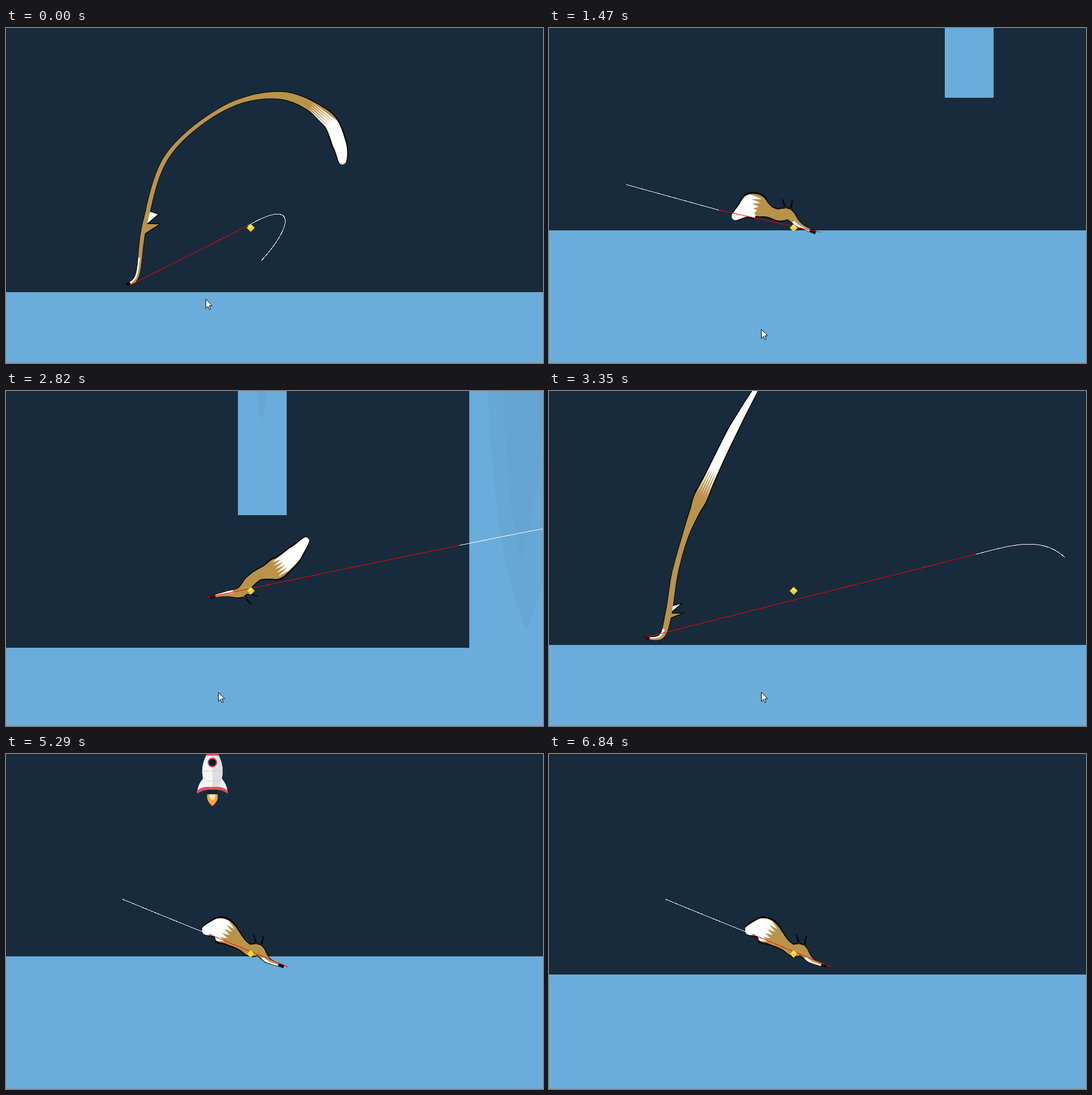
An HTML page that plays this animation: 947 px wide and 591 px high, repeating every 6.94 s.

```html
<!DOCTYPE html>
<html lang="en">
<head>
<meta charset="utf-8">
<title>Stretchy fox</title>
<style>
  html, body { margin: 0; width: 100%; height: 100%; overflow: hidden; background: #182b3c; }
  svg { display: block; }
  .line { fill: none; stroke-width: 1; shape-rendering: crispEdges; }
</style>
</head>
<body>
<svg width="947" height="591" viewBox="0 0 947 591">
  <rect width="947" height="591" fill="#182b3c"/>
  <g id="rocket">
    <path d="M162 122Q148 134 147 152Q155 146 165 146H183Q193 146 201 152Q200 134 186 122Z" fill="#f1f1f1"/>
    <path d="M147 153Q147 147 149 146Q156 141 165 141H183Q192 141 199 146Q201 147 201 153Q191 146 183 146H165Q156 147 147 153Z" fill="#e04f60"/>
    <path d="M165 146H183V154H165Z" fill="#182032"/>
    <path d="M165 154H183Q186 165 174 175Q162 165 165 154Z" fill="#f7a345"/>
    <path d="M169 154H179Q180 161 174 165Q168 161 169 154Z" fill="#ffe9a8"/>
    <path d="M174 70Q155 91 156 116Q157 130 162 141H186Q191 130 192 116Q193 91 174 70Z" fill="#f5f5f5"/>
    <path d="M174 70Q193 91 192 116Q191 130 186 141H174Z" fill="#dedede"/>
    <path d="M174 70Q167 78 163 86H185Q181 78 174 70Z" fill="#e04f60"/>
    <path d="M157 113H191M162 131H186" stroke="#c4c6c8" stroke-dasharray="10 4"/>
    <circle cx="174" cy="98" r="7.5" fill="#121b2c" stroke="#d94a60" stroke-width="2"/>
  </g>
  <g id="wall">
    <rect x="398" y="-500" width="86" height="732" fill="#6aadda"/>
    <path d="M427 -20Q430 30 440 66Q450 30 454 -20Z" fill="#67a6d3"/>
    <rect x="806" y="-500" width="900" height="1100" fill="#6aadda"/>
    <path d="M837 -60Q844 300 907 432Q965 320 972 -60Z" fill="#67a7d4"/>
    <path d="M864 -60Q868 190 897 310Q935 200 942 -60Z" fill="#65a4d1"/>
  </g>
  <rect id="floor" width="947" height="400" fill="#6aadda"/>
  <rect y="590" width="947" height="1" fill="#8798a5"/>
  <g stroke-linejoin="round">
    <path id="outline" fill="#05070a"/>
    <path id="earA" fill="#fff" stroke="#05070a" stroke-width="1.6"/>
    <path id="earB" fill="#ba934a" stroke="#05070a" stroke-width="1.6"/>
    <path id="fur" fill="#ba934a"/>
    <path id="muzzle" fill="#fff"/>
    <path id="tail" fill="#fff"/>
    <path id="nose" fill="#05070a"/>
  </g>
  <path id="trail" class="line" stroke="#fff"/>
  <path id="aim" class="line" stroke="#f00"/>
  <path d="M431.5 345.5L438.5 352.5L431.5 359.5L424.5 352.5Z" fill="#f3d42c" stroke="#a98a12"/>
  <path d="M431.5 347L436 351.5H427Z" fill="#fbe96b"/>
  <path id="cursor" d="M.5 .5V16.5L4.2 13L6.8 18.6L9 17.6L6.5 12H11.5Z" fill="#fff" stroke="#000"/>
</svg>
<script>
const LOOP = 6940, FIRST = 30, LAST = 6840;
const GROUND = 357, GRAVITY = 0.000667;
const TIP = 8, TAIL = 6, EARS = 2, REST = 20;
const $ = id => document.getElementById(id);
const clamp = (v, lo, hi) => Math.min(hi, Math.max(lo, v));
const mix = (a, b, k) => a + (b - a) * k;

// spine: nose, cheek, ears, three body points, tail start, tail middle, tip
// trail: four Bezier points, then the end of the aim line; ears: side they grow on
const poses = {
  arch: {
    spine: [212,453, 232,435, 245,345, 285,225, 385,141, 485,119, 562,155, 588,205, 594,241],
    trail: [450,411, 510,345, 510,300, 426,349, 220,453], ears: [1]
  },
  swing: {
    spine: [737,392, 712,330, 677,240, 630,178, 560,101, 460,38, 330,3, 150,21, -40,140],
    trail: [233,401, 200,370, 235,308, 330,322, 724,379], ears: [-1]
  },
  dangle: {
    spine: [378,298, 345,270, 316,249, 290,255, 270,268, 261,285, 254,308, 243,370, 220,444],
    trail: [-180,369, -110,358, -40,345, 26,335, 385,288], ears: [1]
  },
  reach: {
    spine: [166,435, 198,433, 211,392, 222,322, 240,257, 258,210, 279,163, 325,68, 372,-15],
    trail: [910,294, 870,255, 815,272, 753,288, 165,436], ears: [1]
  },
  left: {
    spine: [410,345, 440,338, 468,345, 485,340, 500,342, 518,347, 537,349, 558,345, 575,332],
    trail: [1040,218, 960,238, 890,254, 812,268, 405,345], ears: [1]
  },
  leap: {
    spine: [609,227, 550,197, 480,182, 435,200, 408,222, 388,248, 365,282, 300,383, 255,485],
    trail: [400,428, 399,390, 392,330, 438,307, 598,217], ears: [1]
  },
  right: {
    spine: [490,375, 462,364, 446,347, 430,346, 418,338, 404,327, 388,315, 370,308, 346,313],
    trail: [205,256, 256,277, 307,298, 358,318, 498,376], ears: [1]
  }
};

const acts = [[FIRST,'arch'], [230,'left'], [380,'right'], [870,'swing'], [1250,'right'],
  [2070,'dangle'], [2420,'right'], [2600,'left'], [3350,'reach'], [3680,'left'], [4900,'left'],
  [5050,'right'], [5750,'right'], [6110,'leap'], [LAST,'right']];
// each jump: time of its peak and its height
const jumps = [[-247,160], [648,161], [2204,121], [3079,140], [3866,130], [6423,148]];
const scrollKeys = [[FIRST,600], [870,600], [2070,0], [2460,-70], [2850,17], [3350,580],
  [4310,950], [5000,1200], [6110,943], [LAST,600]];

function between(keys, t) {
  let i = 0;
  while (i < keys.length - 2 && t >= keys[i + 1][0]) i++;
  const [t0, from] = keys[i], [t1, to] = keys[i + 1];
  return { from, to, k: (t - t0) / (t1 - t0) };
}

function poseAt(t) {
  const { from, to, k } = between(acts, t), eased = k * k * (3 - 2 * k), pose = {};
  for (const key in poses[from])
    pose[key] = poses[from][key].map((v, i) => mix(v, poses[to][key][i], eased));
  return pose;
}

const floorAt = t => GROUND + Math.max(0, ...jumps.map(([peak, h]) => h - GRAVITY * (t - peak) ** 2));

function scrollAt(t) {
  const { from, to, k } = between(scrollKeys, t);
  return mix(from, to, k);
}

// Catmull-Rom through the spine points
function spinePoint(spine, u) {
  u = clamp(u, 0, TIP);
  const i = Math.min(Math.floor(u), TIP - 1), s = u - i;
  return [0, 1].map(axis => {
    const [a, b, c, e] = [-1, 0, 1, 2].map(o => spine[clamp(i + o, 0, TIP) * 2 + axis]);
    return b + s / 2 * (c - a + s * (2 * a - 5 * b + 4 * c - e + s * (3 * (b - c) + e - a)));
  });
}

const bump = (u, centre, spread) => Math.exp(-(((u - centre) / spread) ** 2));
const restWidth = u =>
  (3 + 16 * bump(u, 2.4, 1.6) + 40 * bump(u, 6.5, 2)) * Math.sqrt(1 - (u / TIP) ** 12);

const draw = (id, points) => $(id).setAttribute('d',
  'M' + points.map(p => p[0].toFixed(1) + ' ' + p[1].toFixed(1)).join('L') + 'Z');
const range = (from, to, n) => Array.from({ length: n + 1 }, (_, i) => mix(from, to, i / n));

function drawFox({ spine, ears }) {
  const frame = u => {
    const lo = clamp(u - .05, 0, TIP), hi = clamp(u + .05, 0, TIP);
    const p = spinePoint(spine, lo), q = spinePoint(spine, hi);
    const dx = q[0] - p[0], dy = q[1] - p[1], len = Math.hypot(dx, dy) || 1;
    return { at: spinePoint(spine, u), tx: dx / len, ty: dy / len, speed: len / (hi - lo) };
  };
  const offset = ({ at, tx, ty }, along, out) => [at[0] + tx * along - ty * out, at[1] + ty * along + tx * out];
  // the more a part is stretched, the thinner it gets
  const edge = (u, side, rim = 0) => {
    const f = frame(u), width = restWidth(u) * Math.min(1.05, Math.sqrt(REST / f.speed));
    return offset(f, 0, side * (width / 2 + rim * (.4 + width * .07)));
  };
  const ribbon = (from, to, a, b, n, rim) => [
    ...range(from, to, n).map(u => edge(u, a, rim)),
    ...range(to, from, n).map(u => edge(u, b, rim))
  ];
  draw('outline', ribbon(0, TIP, -1, 1, 80, 1));
  draw('fur', ribbon(0, TIP, -1, 1, 80));
  draw('muzzle', ribbon(.4, 1.4, -.95, -.1, 8));
  draw('nose', ribbon(0, .4, -1, 1, 4));

  const teeth = range(-.96, .96, 10).map((side, i) => edge(TAIL + (i % 2 ? -.4 : .3), side));
  draw('tail', [...teeth, ...ribbon(TAIL + .3, TIP, .96, -.96, 24)]);

  const head = frame(EARS);
  draw('earA', [edge(EARS + .2, 0), offset(head, 22, 20 * ears[0]), edge(EARS - .05, 0)]);
  draw('earB', [edge(EARS, 0), offset(head, 6, 27 * ears[0]), edge(EARS - .2, 0)]);
}

function render(t) {
  const floor = floorAt(t), scroll = scrollAt(t), pose = poseAt(t);
  const move = (id, x, y) => $(id).setAttribute('transform', `translate(${Math.round(x)} ${Math.round(y)})`);
  $('floor').setAttribute('y', Math.round(floor));
  move('wall', scroll, floor - 466);
  move('rocket', scroll - 943, floor - 440);
  drawFox(pose);

  const trail = pose.trail;
  $('trail').setAttribute('d', `M${trail.slice(0, 2)}C${trail.slice(2, 8)}`);
  $('aim').setAttribute('d', `M${trail.slice(6, 8)}L${trail.slice(8)}`);

  const slide = clamp((t - 150) / 400, 0, 1);
  move('cursor', mix(352, 374, slide), mix(478, 531, slide));
  $('cursor').style.display = t < 3800 ? '' : 'none';
}

const started = performance.now();
function tick() {
  const t = (performance.now() - started) % LOOP;
  render(clamp(t, FIRST, LAST));
  requestAnimationFrame(tick);
}
tick();
</script>
</body>
</html>
```
